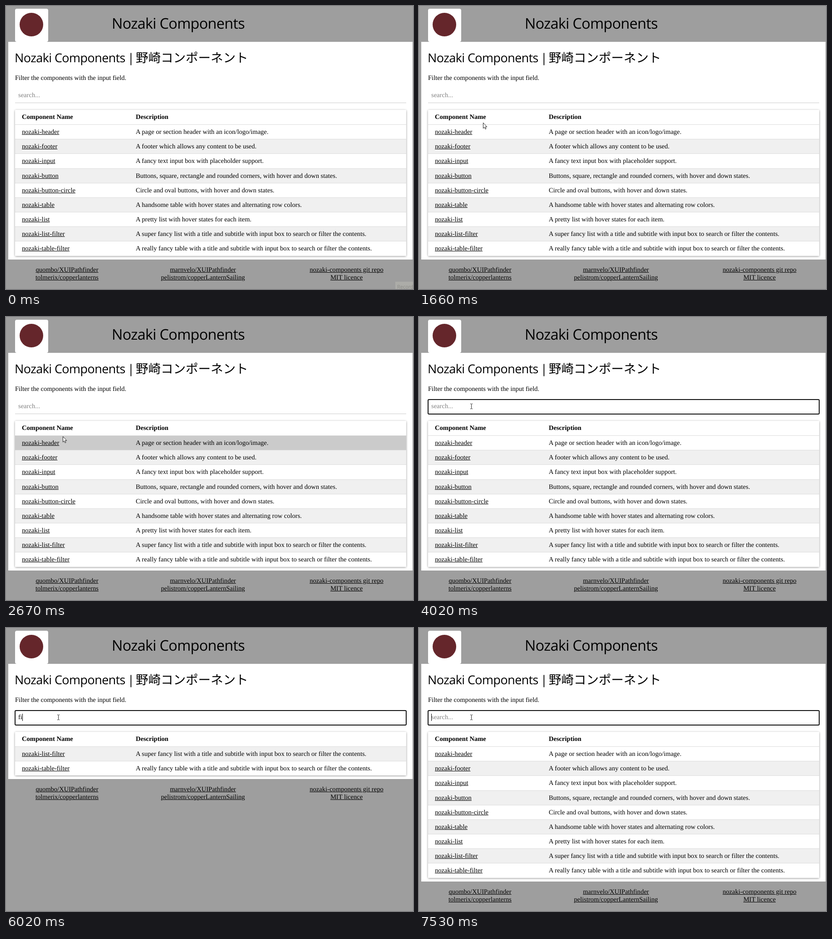
Recreate the animation shown at these times as an HTML page with a canvas. Size 897 by 624 pixels, loop 8000 ms.

```html
<!DOCTYPE html>
<html lang="en">
<head>
<meta charset="utf-8">
<title>Nozaki Components</title>
<style>
html, body { margin: 0; width: 100%; height: 100%; overflow: hidden; background: #9e9e9e; }
body { position: relative; color: #000; font: 14.55px/16px "Liberation Serif", serif; text-rendering: geometricPrecision; }
div, canvas { position: absolute; white-space: pre; box-sizing: border-box; }
u { text-decoration-thickness: 1px; }
.logo { left: 20px; top: 6px; width: 73px; height: 73px; border-radius: 4px; background: #fff; }
.logo div { left: 10px; top: 9px; width: 52px; height: 52px; border-radius: 50%; background: #65262b; }
.title { left: 233px; top: 16px; font: 32.3px/44px "Open Sans", "Noto Sans", sans-serif; letter-spacing: -.02em; }
.page { left: 5px; top: 79px; width: 891px; background: #fff; }
.heading { top: 95px; font: 26.9px/37px "Open Sans", "Noto Sans", sans-serif; letter-spacing: -.02em; }
.kanji { left: 286px; top: 92px; font: 27.5px/40px "Noto Sans CJK JP", "Noto Sans CJK", sans-serif; }
.field { left: 19px; top: 181px; width: 864px; height: 34px; }
.idle { border-bottom: 1px solid #ccc; left: 20px; width: 862px; height: 33px; }
.focus { border: 2px solid #101010; border-radius: 3px; }
.caret { top: 189px; width: 1px; height: 16px; background: #000; }
.table { left: 20px; top: 229px; width: 862px; background: #fff; border-radius: 2px; overflow: hidden; }
.shadow { left: 20px; top: 229px; width: 862px; border-radius: 2px; box-shadow: 0 1px 4px rgba(0,0,0,.42); }
.row { left: 0; width: 100%; border-top: 1px solid #dcdcdc; }
.name, .about { top: 8px; }
.name { left: 15px; }
.about { left: 266px; }
.foot { width: 300px; text-align: center; line-height: 17px; }
.tip { left: 858px; top: 608px; width: 39px; height: 16px; padding-left: 4px; overflow: hidden; background: #acaca8; color: #8c8c88; font: 11px/24px "Open Sans", sans-serif; }
</style>
</head>
<body>
<script>
const ROW_H = 32.17, TABLE_TOP = 229, ROWS_TOP = 261, LOOP = 8000;
const ITEMS = [
  ['header', 'A page or section header with an icon/logo/image.'],
  ['footer', 'A footer which allows any content to be used.'],
  ['input', 'A fancy text input box with placeholder support.'],
  ['button', 'Buttons, square, rectangle and rounded corners, with hover and down states.'],
  ['button-circle', 'Circle and oval buttons, with hover and down states.'],
  ['table', 'A handsome table with hover states and alternating row colors.'],
  ['list', 'A pretty list with hover states for each item.'],
  ['list-filter', 'A super fancy list with a title and subtitle with input box to search or filter the contents.'],
  ['table-filter', 'A really fancy table with a title and subtitle with input box to search or filter the contents.']
];
const LINKS = [
  [134.5, 'quombo/XUIPathfinder', 'tolmerix/copperlanterns'],
  [434, 'marnvelo/XUIPathfinder', 'pelistrom/copperLanternSailing'],
  [750.5, 'nozaki-components git repo', 'MIT licence']
];
// time, typed text, applied filter (the list trails the typing)
const TYPING = [
  [0, '', ''], [4350, 'f', ''], [4520, 'f', 'f'], [4690, 'fi', 'f'], [5020, 'fil', 'fi'],
  [6020, 'fi', 'fi'], [6190, 'f', 'f'], [6540, '', 'f'], [6690, '', '']
];
const CARET_OFF = [[0, 3520], [4020, 4350], [5520, 6020], [7020, 7530]];
// time, x, y of the pointer
const POINTER = [
  [170, 600, 520], [330, 430, 420], [490, 330, 350], [650, 291, 324], [820, 262, 314],
  [1150, 215, 300], [1320, 185, 284], [1490, 158, 267], [1660, 141, 257], [1820, 138, 266],
  [1990, 135, 290], [2160, 132, 318], [2330, 131, 336], [2500, 129, 305], [2670, 125, 263],
  [2840, 121, 240], [3010, 118, 215], [3180, 116, 200], [3350, 115, 197]
];
const TICKS = [0, 170, 330, 490, 650, 820, 980, 1150, 1320, 1490, 1660, 1820, 1990, 2160, 2330,
  2500, 2670, 2840, 3010, 3180, 3350, 3520];

function add(cls, html = '', parent = document.body) {
  const el = document.createElement('div');
  el.className = cls;
  el.innerHTML = html;
  parent.append(el);
  return el;
}
const place = (el, styles) => {
  for (const key in styles) el.style[key] = styles[key] + 'px';
};
const rowY = i => Math.round(ROWS_TOP + ROW_H * i);

add('logo', '<div></div>');
add('title', 'Nozaki Components');
const page = add('page');
place(add('heading', 'Nozaki Components'), { left: 19 });
place(add('heading', '|'), { left: 268 });
add('kanji', '野崎コンポーネント');
place(add('', 'Filter the components with the input field.'), { left: 20, top: 151 });
const field = add('field');
const typed = add('');
place(typed, { left: 27, top: 189 });
const caret = add('caret');
const shadow = add('shadow');
const table = add('table');
add('name', '<b>Component Name</b>', table);
add('about', '<b>Description</b>', table);
const rows = ITEMS.map(([name, about]) => {
  const row = add('row', '', table);
  add('name', `<u>nozaki-${name}</u>`, row);
  add('about', about, row);
  return row;
});
const feet = LINKS.map(([x, ...lines]) => {
  const foot = add('foot', lines.map(s => `<u>${s}</u>`).join('\n'));
  place(foot, { left: x - 150 });
  return foot;
});
const tip = add('tip', 'Record');

const canvas = document.createElement('canvas');
canvas.width = 897;
canvas.height = 624;
place(canvas, { left: 0, top: 0 });
document.body.append(canvas);
const ctx = canvas.getContext('2d');

function pointerAt(t) {
  if (t < POINTER[0][0]) return null;
  const time = TICKS.filter(k => k <= t).pop();
  const next = POINTER.findIndex(p => p[0] > time);
  if (next < 0) return POINTER[POINTER.length - 1].slice(1);
  const [t0, x0, y0] = POINTER[next - 1], [t1, x1, y1] = POINTER[next];
  const k = (time - t0) / (t1 - t0);
  return [x0 + (x1 - x0) * k, y0 + (y1 - y0) * k].map(Math.round);
}

const ARROW = new Path2D('M.5.5V12.8L3.2 10.2 5.1 14.5 7 13.7 5.2 9.5H8.8Z');
const BEAM = new Path2D('M-2.5-5.5H-.5M.5-5.5H2.5M0-5V5M-2.5 5.5H-.5M.5 5.5H2.5');

function drawPointer(pos) {
  ctx.clearRect(0, 0, 897, 624);
  if (!pos) return;
  const [x, y] = pos, inField = y > 181 && y < 214;
  ctx.save();
  ctx.translate(x + (inField ? .5 : 0), y);
  ctx.strokeStyle = '#222';
  ctx.lineWidth = 1;
  if (!inField) {
    ctx.fillStyle = '#fff';
    ctx.fill(ARROW);
  }
  ctx.stroke(inField ? BEAM : ARROW);
  ctx.restore();
}

function render(t) {
  const [, text, filter] = TYPING.filter(s => s[0] <= t).pop();
  const focused = t >= 3520, pos = pointerAt(t);
  let n = 0;
  rows.forEach((row, i) => {
    const shown = ITEMS[i].join(' ').includes(filter);
    row.style.display = shown ? '' : 'none';
    if (!shown) return;
    const top = rowY(n), bottom = rowY(++n);
    const hover = pos && pos[1] + 2 >= top && pos[1] + 2 < bottom;
    place(row, { top: top - TABLE_TOP, height: bottom - top });
    row.style.background = hover ? '#cbcbcb' : i % 2 ? '#f0f0f0' : '#fff';
  });
  const end = rowY(n);
  place(table, { height: end - TABLE_TOP });
  place(shadow, { height: end - TABLE_TOP });
  place(page, { height: end + 8 - 79 });
  feet.forEach(foot => place(foot, { top: end + 23 }));

  field.className = 'field ' + (focused ? 'focus' : 'idle');
  typed.textContent = text || 'search...';
  typed.style.color = text ? '#000' : '#808080';
  place(caret, { left: 27 + (text ? Math.round(typed.getBoundingClientRect().width) : 0) });
  caret.hidden = CARET_OFF.some(([a, b]) => t >= a && t < b);
  tip.hidden = t >= 170;
  drawPointer(pos);
}

const start = performance.now();
function frame() {
  render((performance.now() - start) % LOOP);
  requestAnimationFrame(frame);
}
frame();
</script>
</body>
</html>
```
